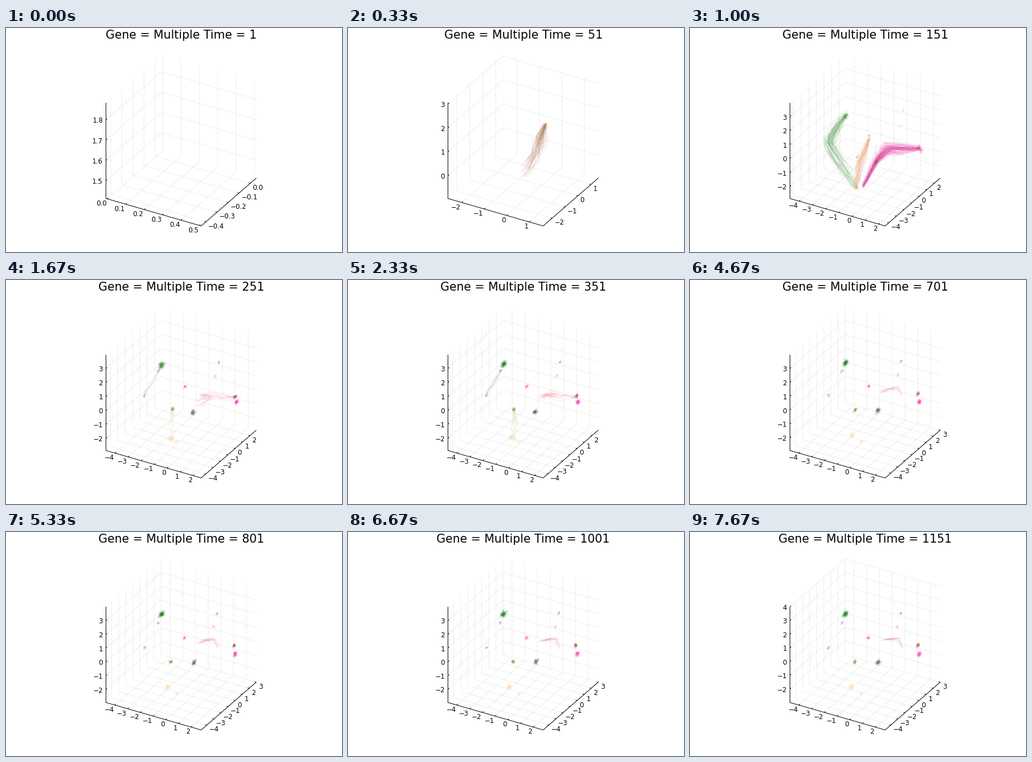
These frames come from a looping animation (600 px wide and 400 px high, 8 s). A matplotlib script:

```python
import numpy as np
import matplotlib.pyplot as plt
from matplotlib.animation import FuncAnimation
from matplotlib.collections import LineCollection

W, H = 600, 400
LOOP, TICK, STEPS = 8000, 50, 24
PX = 0.72  # points per pixel at 100 dpi

plt.rcParams["font.family"] = "DejaVu Sans"
fig = plt.figure(figsize=(W / 100, H / 100), dpi=100, facecolor="white")
ax = fig.add_axes([0, 0, 1, 1])

# Orthographic box: origin and the screen vectors of the three axes
ORIGIN = np.array([178.5, 304.5])
EX, EY, EZ = np.array([[170, 49], [98.5, -85.5], [0, -171]], float)

# Axis limits at the start, after the first spread, and at the end
LIMITS = {
    "x": np.array([(-.008, .51), (-4.7, 2.51), (-4.7, 2.785)]),
    "y": np.array([(-.443, .0545), (-4.47, 2.78), (-4.8, 3.02)]),
    "z": np.array([(1.4117, 1.884), (-2.86, 3.98), (-2.99, 4.0004)]),
}

PINK, GREEN, CORAL, SAND = "#ff1a9f", "#147a14", "#f08070", "#ecc088"

# Landmarks on the stage that the trails run between
TOP, VALLEY, FORK, EAST = (352, 172), (297, 286), (334, 235), (411, 215)
WEST, NORTH = (247, 204), (278, 155)

# path, width, skew of the widest part, colours, count, first and last delay
STREAMS = [
    ([TOP, (335, 225), VALLEY], 9, 1, [PINK, CORAL, GREEN, SAND], 110, 0, 1),
    ([(309, 283), FORK, (354, 215), EAST], 7.5, 1.8,
     [PINK, PINK, "#f060b0", "#b8508c"], 150, 1.3, 2.4),
    ([VALLEY, (268, 240), WEST, (262, 177), NORTH], 9, .6,
     [GREEN, "#5f9f5f", GREEN, "#a8c49a"], 85, 1.2, 2.4),
    ([VALLEY, (302, 245), (320, 197)], 6, 1, [CORAL, SAND, "#f0a080"], 75, 1.2, 2.4),
    ([VALLEY, (297, 234)], 5, .6, [SAND, "#d0c8a0"], 60, 2.2, 7.4),
    ([WEST, (275, 160)], 2.5, 1, ["#a0b4a0", "#a8a8a8"], 60, 2.5, 11),
    ([(348, 205), (409, 210)], 6, .8, ["#ff8fa8", "#d8a090"], 75, 2.5, 7.8),
]

# colour, resting place, size, and the way still to go when a cloud appears
CLOUDS = [
    (GREEN, (277.5, 146), 3.3, (1, 10)),
    ("#70a585", (271.5, 162.5), 1.6, (0, 0)),
    ("#909090", (247.5, 206.5), 1.6, (0, 0)),
    ("#ff5050", (319, 189), 1.9, (1, 2)),
    ("#8a6d14", (294.5, 232), 2.1, (4, -2)),
    ("#505050", (336, 232.5), 2.7, (-3, 6)),
    ("#ffdcb0", (288, 276), 2.8, (9, 11)),
    ("#ffdcb0", (305.5, 289), 1.7, (-3, 0)),
    ("#c87088", (376.5, 145), 1.6, (5, 3)),
    ("#f5bc80", (370.5, 169), 1.7, (5, 5)),
    ("#9c2424", (407, 202), 2.1, (3, 10)),
    (PINK, (409, 218), 2.6, (4, 0)),
]


def lines(segments, color, alpha, width=1.0):
    ax.add_collection(LineCollection(segments, colors=color, alpha=alpha,
                                     linewidths=width * PX))


def text(x, y, label, size, **align):
    ax.text(x, y, label, fontsize=size * PX, color="black", **align)


def along(points, u):
    """Points at parameters u in 0..1 of a polyline."""
    knots = np.linspace(0, 1, len(points))
    return np.column_stack([np.interp(u, knots, c) for c in np.asarray(points).T])


def limits(axis, step):
    start, spread, end = LIMITS[axis]
    opening = 1 - (1 - min(step / 3, 1)) ** 2
    drift = np.clip((step - 3) / (STEPS - 4), 0, 1)
    if axis != "z":
        drift = min(1.25 * drift ** .5, 1)
    return start + (spread - start) * opening + (end - spread) * drift


def draw_box(step):
    unit, digits = (.1, 1) if step == 0 else (1, 0)
    grid, marks = [], []
    for axis, vec in zip("xyz", (EX, EY, EZ)):
        lo, hi = limits(axis, step)
        for i in range(int(np.ceil(lo / unit)), int(np.floor(hi / unit)) + 1):
            p = ORIGIN + vec * (i * unit - lo) / (hi - lo)
            label = f"{i * unit:.{digits}f}".replace("-", "\u2212")
            if axis == "x":
                grid.append([p, p + EY, p + EY + EZ])
                marks.append([p, p + .02 * EY])
                text(p[0] - 1.5, p[1] + 7, label, 11.9, ha="right", va="center_baseline")
            elif axis == "y":
                grid.append([p + EZ, p, p + EX])
                p = p + EX
                marks.append([p, p - .015 * EX])
                text(p[0] + 4, p[1] + 6.5, label, 11.9, ha="left", va="center_baseline")
            else:
                grid.append([p, p + EY, p + EY + EX])
                marks.append([p, p + .02 * EY])
                text(173, p[1] + .5, label, 11.9, ha="right", va="center_baseline")
    lines(grid, "black", .07)
    lines(marks, "black", 1)
    lines([[ORIGIN + EZ, ORIGIN, ORIGIN + EX, ORIGIN + EX + EY]], "black", 1)


def draw_stream(step, index):
    """Particles leave one after another, each with a short trail behind it."""
    path, width, skew, colors, n, first, last = STREAMS[index]
    rng = np.random.default_rng(100 + index)
    groups = {c: [] for c in colors}
    for i in range(n):
        head = (step - rng.uniform(first, last)) / 1.2
        tail = max(head - .75, 0)
        side = rng.normal(size=2) * .6
        wobble = side + rng.normal(size=(6, 2)) * .45
        noise = rng.normal(size=(16, 2)) * .6
        if head <= 0 or tail >= 1:
            continue
        u = np.linspace(tail, min(head, 1), 16)
        spread = width * (.25 + .75 * np.sin(np.pi * u ** skew))[:, None]
        groups[colors[i % len(colors)]].append(
            along(path, u) + along(wobble, u) * spread + noise)
    for color, segments in groups.items():
        lines(segments, color, .14, .9)


def draw_cloud(step, index):
    """Tangled walks around a place that settles over time."""
    color, place, size, way = CLOUDS[index]
    count = int(8 * size ** 1.6 * np.clip((step - 2) / 3, 0, 1))
    if not count:
        return
    center = np.array(place) + np.array(way) * np.exp(-(step - 3) / 5)
    rng = np.random.default_rng([index, step])
    walk = rng.normal(size=(count, 1, 2)) * .8 + rng.normal(size=(count, 8, 2)) * .6
    c, s = np.cos(1), np.sin(1)
    lines(list(center + walk * [size, .7 * size] @ np.array([[c, -s], [s, c]])), color, .11)


def draw_bundle(step):
    """A loose tangle that tightens into a flat arc with a short drop."""
    if step < 5:
        return
    loose = np.exp(-(step - 7) / 4)
    rise = 3 + 9 * ((STEPS - 1 - step) / STEPS) ** .5
    spread = 1.2 + 3 * loose
    rng = np.random.default_rng(step)
    arc, drop = [], []
    for _ in range(32):
        start = rng.uniform(0, .6)
        u = np.linspace(start, start + rng.uniform(.25, .4), 10)
        y = 190 + 12 * loose + rise * (1 - u) ** 2
        offset = along(rng.normal(size=(4, 2)) * spread, u)
        arc.append(np.column_stack([339 + 40 * u, y]) + offset)
    for _ in range(14):
        ends = np.array([(371, 190), (378, 206)]) + rng.normal(size=(2, 2)) * 1.8
        drop.append(along(ends, np.linspace(0, 1, 8)) + rng.normal(size=(8, 2)) * .5)
    lines(arc, "#f58a98", .14)
    lines(drop, "#f8a8d0", .12 * (1 - min(loose, 1)))


def draw(frame):
    step = (frame * TICK + 35) * STEPS // LOOP
    ax.clear()
    ax.set(xlim=(0, W), ylim=(H, 0))
    ax.axis("off")
    draw_box(step)
    for index in range(len(STREAMS)):
        draw_stream(step, index)
    for index in range(len(CLOUDS)):
        draw_cloud(step, index)
    draw_bundle(step)
    text(313, 18.6, f"Gene = Multiple Time = {1 + 50 * step}", 20.8,
         ha="center", va="baseline")
    return []


anim = FuncAnimation(fig, draw, frames=LOOP // TICK, interval=TICK,
                     init_func=lambda: [], repeat=True, repeat_delay=0)
plt.show()
```
